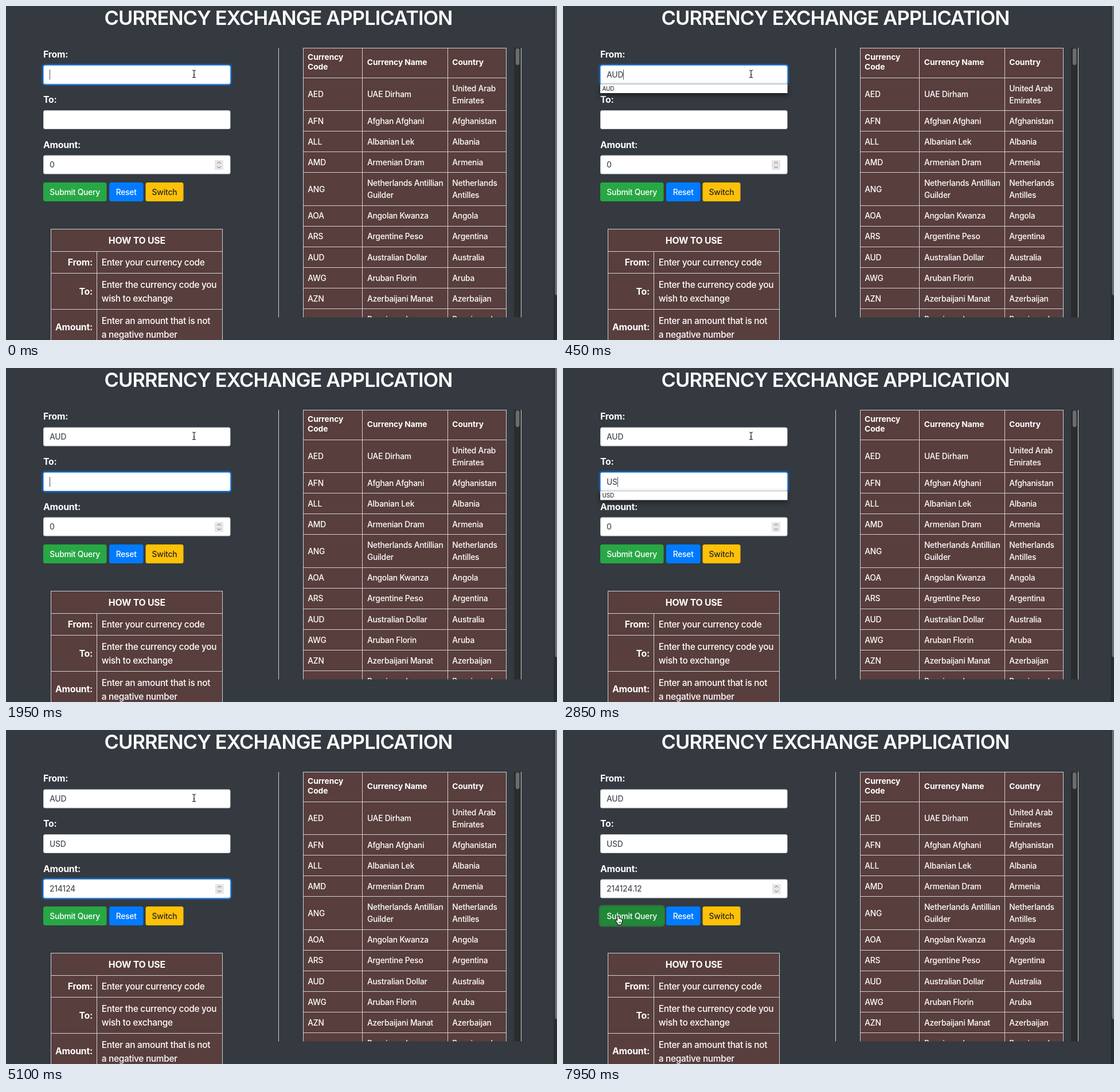
These frames come from a looping animation (961x583 px, 8000 ms). An HTML page with a canvas:

```html
<!DOCTYPE html>
<html lang="en">
<head>
<meta charset="utf-8">
<title>Currency Exchange Application</title>
<style>
  html, body { margin: 0; width: 100%; height: 100%; overflow: hidden; background: #343a40; }
  canvas { display: block; width: 961px; height: 583px; }
</style>
</head>
<body>
<canvas id="stage"></canvas>
<script>
const W = 961, H = 583, LOOP = 8000, STEP = 150;
const FONT = 'Inter, "Liberation Sans", sans-serif';
const BG = '#343a40', CELL = '#583e3d', LINE = '#d0d2d5', INK = '#495057';

const canvas = document.getElementById('stage');
const ctx = canvas.getContext('2d');
const dpr = window.devicePixelRatio || 1;
canvas.width = W * dpr;
canvas.height = H * dpr;

const STYLES = {
  title: { size: 34.4, weight: 560, track: -0.025 },
  label: { size: 15.8, weight: 700, track: -0.014 },
  guide: { size: 15.4, weight: 500, track: -0.018 },
  head: { size: 13.8, weight: 700, track: -0.004 },
  cell: { size: 13.8, weight: 500, track: -0.016 },
  input: { size: 13.8, weight: 450, track: -0.01 },
  typed: { size: 13.8, weight: 550, track: -0.014 },
  option: { size: 9.8, weight: 400, track: -0.01 }
};

const clamp = v => Math.max(0, Math.min(1, v));
const ramp = (t, start) => clamp((t - start) / 150);

function useStyle(name) {
  const s = STYLES[name];
  ctx.font = `${s.weight} ${s.size}px ${FONT}`;
  ctx.letterSpacing = s.size * s.track + 'px';
  return s;
}

// y is the middle of the capital letters
function text(str, x, y, style, color = '#fff', align = 'left') {
  const s = useStyle(style);
  ctx.textAlign = align;
  ctx.fillStyle = color;
  ctx.fillText(str, x, y + s.size * 0.3635);
}

function textWidth(str, style) {
  useStyle(style);
  return ctx.measureText(str).width;
}

function rect(x, y, w, h, color) {
  ctx.fillStyle = color;
  ctx.fillRect(x, y, w, h);
}

function rounded(x, y, w, h, r, color) {
  ctx.fillStyle = color;
  ctx.beginPath();
  ctx.roundRect(x, y, w, h, r);
  ctx.fill();
}

const hLine = (x0, x1, y) => rect(x0, y, x1 - x0 + 1, 1, LINE);
const vLine = (x, y0, y1) => rect(x, y0, 1, y1 - y0, LINE);

const ROWS = [
  ['AED', ['UAE Dirham'], ['United Arab', 'Emirates']],
  ['AFN', ['Afghan Afghani'], ['Afghanistan']],
  ['ALL', ['Albanian Lek'], ['Albania']],
  ['AMD', ['Armenian Dram'], ['Armenia']],
  ['ANG', ['Netherlands Antillian', 'Guilder'], ['Netherlands', 'Antilles']],
  ['AOA', ['Angolan Kwanza'], ['Angola']],
  ['ARS', ['Argentine Peso'], ['Argentina']],
  ['AUD', ['Australian Dollar'], ['Australia']],
  ['AWG', ['Aruban Florin'], ['Aruba']],
  ['AZN', ['Azerbaijani Manat'], ['Azerbaijan']],
  ['BAM', ['Bosnia and', 'Mark'], ['Bosnia and', 'Herzegovina']]
];

function lines(list, x, mid, gap, style) {
  list.forEach((s, i) => text(s, x, mid + (i - (list.length - 1) / 2) * gap, style));
}

function drawCurrencies() {
  ctx.save();
  ctx.beginPath();
  ctx.rect(470, 72.5, 440, 471);
  ctx.clip();
  rect(518, 73, 355, 480, CELL);
  hLine(518, 872, 73);
  lines(['Currency', 'Code'], 526, 97.5, 17, 'head');
  text('Currency Name', 629.8, 97.5, 'head');
  text('Country', 778.3, 97.5, 'head');
  let y = 124.6;
  for (const [code, name, country] of ROWS) {
    const tall = Math.max(name.length, country.length) > 1;
    const h = tall ? 57.3 : 36.1;
    const mid = y + h / 2 + 0.8;
    hLine(518, 872, Math.round(y));
    text(code, 526.3, mid, 'cell');
    lines(name, 629.9, mid, 21, 'cell');
    lines(country, 778.3, mid, 21, 'cell');
    y += h;
  }
  for (const x of [518, 621, 770, 872]) vLine(x, 73, 544);
  rect(886, 73, 12, 471, '#2b2c2d');
  rounded(889, 74, 6.5, 29, 3.2, '#6d6d6d');
  vLine(475, 73, 544);
  vLine(898, 73, 544);
  ctx.restore();
}

function drawGuide() {
  rect(78, 389, 300, 200, CELL);
  for (const y of [389, 428, 466, 529]) hLine(78, 377, y);
  vLine(78, 389, H);
  vLine(377, 389, H);
  vLine(158, 428, H);
  text('HOW TO USE', 228.3, 409, 'label', '#fff', 'center');
  text('From:', 151, 447.5, 'label', '#fff', 'right');
  text('To:', 151, 498, 'label', '#fff', 'right');
  text('Amount:', 151, 560.5, 'label', '#fff', 'right');
  lines(['Enter your currency code'], 166.7, 447.5, 24, 'guide');
  lines(['Enter the currency code you', 'wish to exchange'], 166.7, 498, 24, 'guide');
  lines(['Enter an amount that is not', 'a negative number'], 166.7, 561, 24, 'guide');
}

function drawField(y, value, focus, caret, { selected = false, style = 'input' } = {}) {
  const x = 65, w = 326.5, h = 33;
  if (focus > 0) {
    const d = 2.7 * focus;
    rounded(x - d, y - d, w + 2 * d, h + 2 * d, 3.5 + d, `rgba(0,123,255,${0.5 * focus})`);
  }
  rounded(x, y, w, h, 3.5, '#ced4da');
  if (focus > 0) rounded(x, y, w, h, 3.5, `rgba(128,189,255,${focus})`);
  rounded(x + 0.9, y + 0.9, w - 1.8, h - 1.8, 2.7, '#fff');
  const tw = textWidth(value, style);
  if (selected) rect(76, y + 7.5, tw, 18, '#b3d7ff');
  text(value, 76, y + 16.8, style, INK);
  if (caret) rect(Math.round(76 + tw), Math.round(y + 7.5), 1, 17.5, INK);
}

function drawSpinner(x) {
  rounded(x, 269, 15, 17, 1, '#e6e6e6');
  ctx.strokeStyle = '#5c5c5c';
  ctx.lineWidth = 1;
  ctx.beginPath();
  for (const s of [-1, 1]) {
    ctx.moveTo(x + 4.5, 277.5 + s * 2.5);
    ctx.lineTo(x + 7.5, 277.5 + s * 5.5);
    ctx.lineTo(x + 10.5, 277.5 + s * 2.5);
  }
  ctx.stroke();
}

function drawOptions(y, option) {
  ctx.save();
  ctx.shadowColor = 'rgba(0,0,0,0.45)';
  ctx.shadowBlur = 10 * dpr;
  ctx.shadowOffsetY = 4 * dpr;
  rect(65, y, 326.5, 16, '#fff');
  ctx.restore();
  rect(65, y, 326.5, 0.8, '#b9bcc0');
  text(option, 68.5, y + 8.3, 'option', '#111');
}

function drawButtons(hover, focus) {
  if (focus > 0) {
    const d = 2.6 * focus;
    rounded(65 - d, 308 - d, 110.5 + 2 * d, 33 + 2 * d, 3.5 + d, `rgba(40,167,69,${0.5 * focus})`);
  }
  rounded(65, 308, 110.5, 33, 3.5, '#28a745');
  if (hover > 0) rounded(65, 308, 110.5, 33, 3.5, `rgba(33,136,56,${hover})`);
  rounded(180, 308, 59.5, 33, 3.5, '#007bff');
  rounded(243.5, 308, 66, 33, 3.5, '#ffc107');
  text('Submit Query', 120.2, 325, 'cell', '#fff', 'center');
  text('Reset', 209.7, 325, 'cell', '#fff', 'center');
  text('Switch', 276.5, 325, 'input', '#212529', 'center');
}

const POINTERS = {
  beam: 'M-3 -6.5Q-.5 -6.5 0 -5Q.5 -6.5 3 -6.5M0 -5V5M-3 6.5Q-.5 6.5 0 5Q.5 6.5 3 6.5M-1.5 1.5H1.5',
  arrow: 'M0 0V13L3 10.3L5 14.8L7 14L5.1 9.6H9.2Z',
  hand: 'M-2.4 -5.5Q-1.2 -7.3 0 -5.5L.6 -1.6Q2 -2.6 2.7 -1.2Q4.2 -1.9 4.7 -.5Q6 -.8 6 1V3.5L4.6 6V8H-1.3V6.3L-4.6 2Q-4.8 .4 -3 .8L-1.7 2Z'
};

function drawPointer(kind, x, y) {
  const path = new Path2D(POINTERS[kind]);
  ctx.save();
  ctx.translate(x, y);
  ctx.lineJoin = 'round';
  if (kind === 'beam') {
    ctx.strokeStyle = 'rgba(255,255,255,0.9)';
    ctx.lineWidth = 2.6;
    ctx.stroke(path);
    ctx.strokeStyle = '#111';
    ctx.lineWidth = 1.1;
    ctx.stroke(path);
  } else {
    const hand = kind === 'hand';
    ctx.strokeStyle = hand ? '#000' : '#fff';
    ctx.lineWidth = 1.8;
    ctx.stroke(path);
    ctx.fillStyle = hand ? '#fff' : '#000';
    ctx.fill(path);
    if (hand) {
      ctx.lineWidth = 0.8;
      ctx.stroke(new Path2D('M.7 3.2V5.8M2.4 3.2V5.8M4 3.2V5.8'));
    }
  }
  ctx.restore();
}

// Latest entry whose time has been reached
const latest = (list, t) => list.filter(e => e[0] <= t).pop();

const FROM = [[0, ''], [300, 'AU'], [450, 'AUD']];
const TO = [[0, ''], [2850, 'US'], [3000, 'USD']];
const AMOUNT = [[0, '0'], [4200, '2'], [4350, '21'], [4650, '2141'], [4800, '21412'],
  [4950, '214124'], [6300, '214124.1'], [6450, '214124.12']];
const CARET = [[0, true], [1350, false], [1950, true], [2550, false], [2850, true],
  [3450, false], [4200, true], [5100, false], [5700, true], [6900, false]];
const POINTER = [[0, 'beam', 328, 118.5], [7050, 'beam', 300, 128], [7200, 'beam', 210, 201],
  [7350, 'arrow', 108, 296], [7500, 'arrow', 58, 322], [7650, 'hand', 86, 329],
  [7800, 'hand', 97, 331.5]];

function draw(time) {
  const t = Math.floor(time / STEP) * STEP;
  const caret = latest(CARET, t)[1];
  const toFocus = ramp(t, 690), amountFocus = ramp(t, 3390), submitFocus = ramp(t, 7740);
  const editing = t >= 4200 && t < 7800;

  ctx.setTransform(dpr, 0, 0, dpr, 0, 0);
  rect(0, 0, W, H, BG);
  text('CURRENCY EXCHANGE APPLICATION', 475, 20.3, 'title', '#fff', 'center');
  text('From:', 65, 84.5, 'label');
  text('To:', 65, 163, 'label');
  text('Amount:', 65, 242, 'label');

  drawField(103.5, latest(FROM, t)[1], 1 - toFocus, caret && t < 750);
  drawField(182, latest(TO, t)[1], toFocus - amountFocus, caret && t >= 750 && t < 3450);
  drawField(260.5, latest(AMOUNT, t)[1], amountFocus - submitFocus, caret && editing,
    { selected: t >= 3450 && t < 4200, style: editing ? 'typed' : 'input' });
  drawSpinner(t < 3450 ? 364 : 364.8);
  drawButtons(ramp(t, 7560), submitFocus);
  drawGuide();
  drawCurrencies();

  rect(955, 0, 6, H, '#2b2e31');
  rounded(957.5, -8, 8, 513, 4, '#6b6d6f');

  if (t >= 300 && t < 600) drawOptions(136, 'AUD');
  if (t >= 2850 && t < 3150) drawOptions(214.5, 'USD');
  drawPointer(...latest(POINTER, t).slice(1));
}

const begin = performance.now();
function tick() {
  draw((performance.now() - begin) % LOOP);
  requestAnimationFrame(tick);
}
tick();
</script>
</body>
</html>
```
